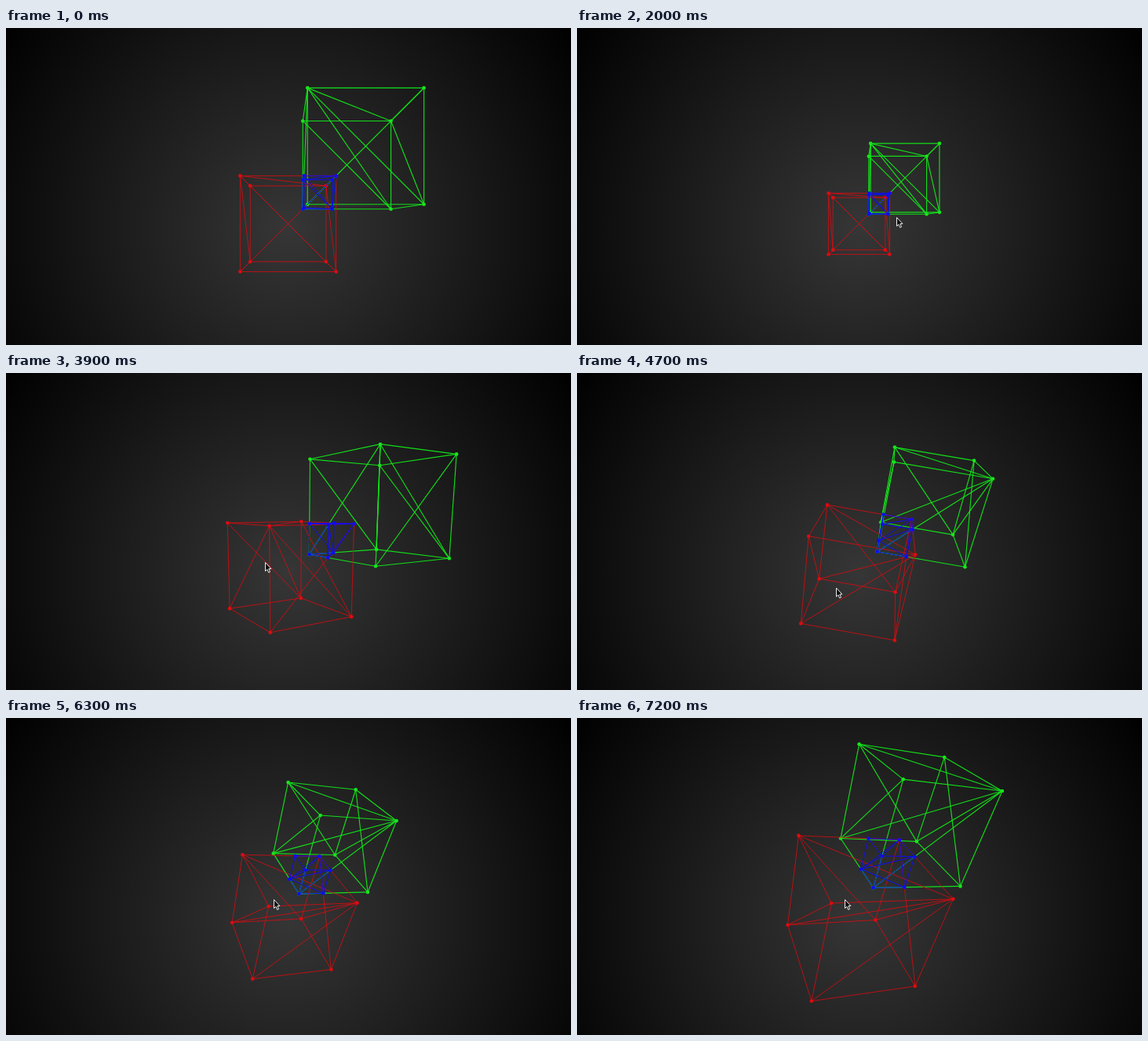
Recreate the animation shown at these times as an HTML page with a canvas. Size 720 by 404 pixels, loop 7.3 s.

```html
<!DOCTYPE html>
<html lang="en">
<head>
<meta charset="utf-8">
<title>Wireframe cubes</title>
<style>
html, body { margin: 0; width: 100%; height: 100%; overflow: hidden; background: #000; }
canvas { display: block; }
</style>
</head>
<body>
<canvas id="stage" width="720" height="404"></canvas>
<script>
const ctx = document.getElementById('stage').getContext('2d');
const LOOP = 7300, STEP = 100;
const FOCAL = 462, CX = 359.5, CY = 249.5;

// A corner is a number 0-7 whose bits 1, 2, 4 pick the high side of x, y, z.
const HUB = 6, NOTCH = 5;
const isSide = (a, b) => [1, 2, 4].includes(a ^ b);

function mesh(accepts, extra) {
  const edges = extra.split(' ').map(pair => [...pair].map(Number));
  for (let a = 0; a < 8; a++) {
    for (let b = a + 1; b < 8; b++) if (accepts(a, b)) edges.push([a, b]);
  }
  return edges;
}

// Whole cubes fan out from the hub; their overlap lacks one corner.
const whole = mesh((a, b) => isSide(a, b) || a === HUB || b === HUB, '21 35 74');
const overlap = mesh((a, b) => isSide(a, b) && a !== NOTCH && b !== NOTCH, '72 71 74 21 41 60 61');

const cubes = [
  { lo: 1 / 6, hi: 7 / 6, edges: whole, line: 'rgba(18,232,26,.95)', dot: '#18e41e', width: 1.15 },
  { lo: -1 / 2, hi: 1 / 2, edges: whole, line: 'rgba(222,10,16,.8)', dot: '#dc0c12', width: 1 },
  { lo: 1 / 6, hi: 1 / 2, edges: overlap, line: 'rgba(12,12,250,.95)', dot: '#0c0cf6', width: 1 }
];

// Smooth 0 to 1 between two times
function ramp(t, from, to) {
  const u = Math.min(1, Math.max(0, (t - from) / (to - from)));
  return u * u * (3 - 2 * u);
}

function cameraAt(t) {
  const swing = ramp(t, 3200, 3900), orbit = ramp(t, 3900, 5000), nudge = ramp(t, 5600, 6000);
  return {
    distance: 4.28 + 2.15 * ramp(t, 1100, 2000) - 2.41 * ramp(t, 2000, 2500)
      + 0.27 * ramp(t, 6000, 6300) - 1.02 * ramp(t, 6400, 7200),
    yaw: 31.2 * swing + 70.5 * orbit + 17.1 * nudge,
    pitch: 9 * swing + 22.2 * orbit + 3.7 * nudge,
    roll: 11.5 * orbit + 3.2 * nudge
  };
}

function turn(a, b, degrees) {
  const angle = degrees * Math.PI / 180, c = Math.cos(angle), s = Math.sin(angle);
  return [a * c + b * s, b * c - a * s];
}

function project(x, y, z, camera) {
  [x, z] = turn(x, z, camera.yaw);
  [z, y] = turn(z, y, camera.pitch);
  [x, y] = turn(x, y, camera.roll);
  const scale = FOCAL / (camera.distance - z);
  return [CX + x * scale, CY - y * scale];
}

function drawCube({ lo, hi, edges, line, dot, width }, camera) {
  const side = (corner, bit) => corner & bit ? hi : lo;
  const corner = i => project(side(i, 1), side(i, 2), side(i, 4), camera);
  ctx.strokeStyle = line;
  ctx.lineWidth = width;
  for (const [a, b] of edges) {
    ctx.beginPath();
    ctx.moveTo(...corner(a));
    ctx.lineTo(...corner(b));
    ctx.stroke();
  }
  ctx.fillStyle = dot;
  for (const i of new Set(edges.flat())) {
    ctx.beginPath();
    ctx.arc(...corner(i), 2.3, 0, Math.PI * 2);
    ctx.fill();
  }
}

const arrow = new Path2D('M0 0V11L2.4 8.8 4.2 12.8 6 12 4.3 8.1 7.4 8Z');

function drawPointer(t) {
  const drag = ramp(t, 4200, 5200), lift = ramp(t, 5500, 6100);
  ctx.save();
  ctx.translate(407.5 - 77 * ramp(t, 2800, 3900) + 11 * lift, 241.5 + 65 * drag - 75 * lift);
  ctx.fillStyle = '#080808';
  ctx.strokeStyle = '#eee';
  ctx.lineWidth = 1;
  ctx.fill(arrow);
  ctx.stroke(arrow);
  ctx.restore();
}

const backdrop = ctx.createRadialGradient(360, 254, 0, 360, 254, 445);
backdrop.addColorStop(0, '#363636');
backdrop.addColorStop(1, '#000');

function draw(now) {
  const t = Math.floor(now % LOOP / STEP) * STEP;
  ctx.fillStyle = backdrop;
  ctx.fillRect(0, 0, 720, 404);
  const camera = cameraAt(t);
  cubes.forEach(cube => drawCube(cube, camera));
  if (t >= 500) drawPointer(t);
}

const start = performance.now();
function tick() {
  draw(performance.now() - start);
  requestAnimationFrame(tick);
}
tick();
</script>
</body>
</html>
```
